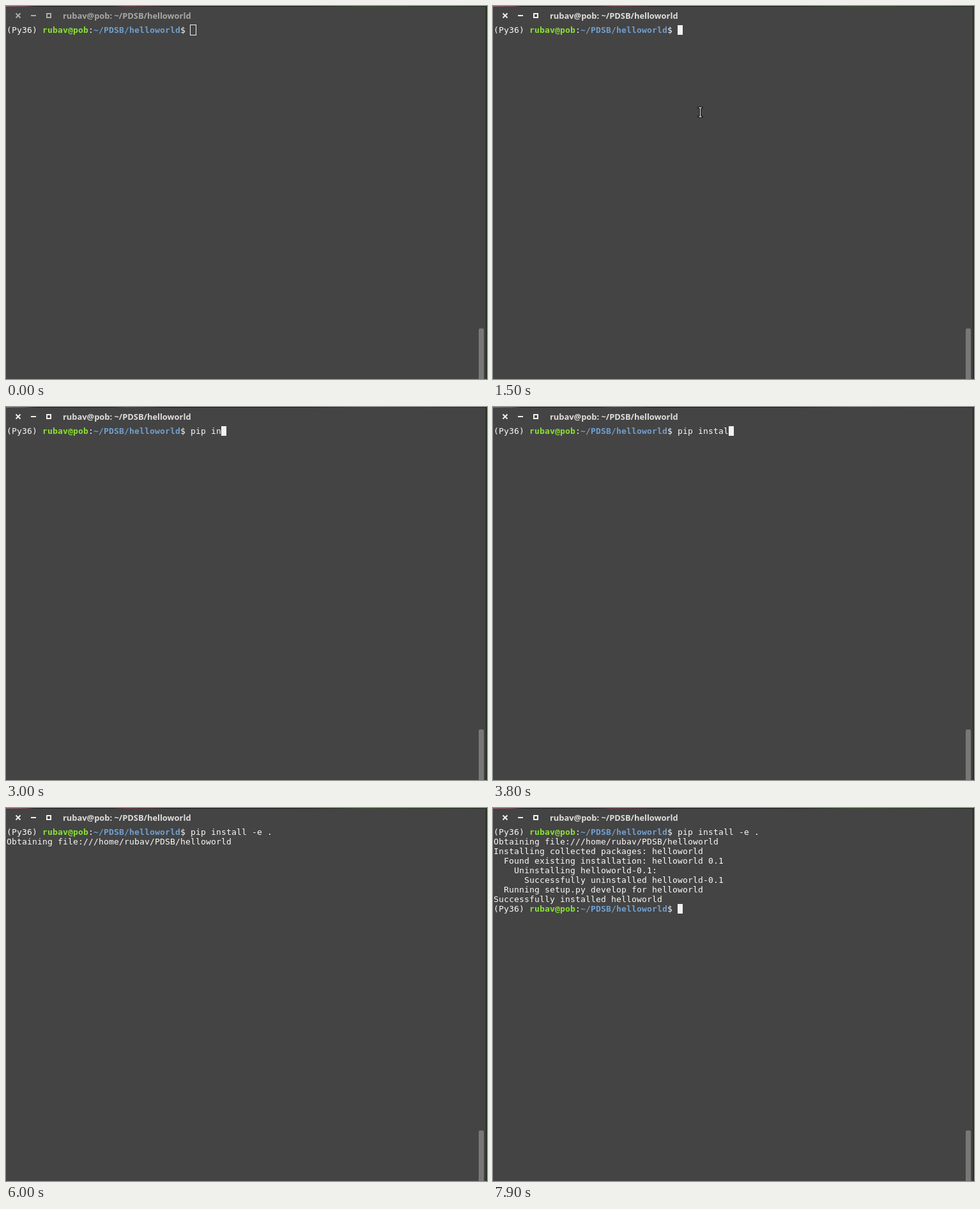
Recreate the animation shown at these times as an HTML page. Size 753 by 583 pixels, loop 8000 ms.

```html
<!DOCTYPE html>
<html lang="en">
<head>
<meta charset="utf-8">
<title>Terminal</title>
<style>
  html, body { margin: 0; width: 100%; height: 100%; overflow: hidden; background: #444; }
  svg { display: block; }
  text { white-space: pre; }
  /* whole-pixel terminal cells */
  #screen { font: 13px "DejaVu Sans Mono", monospace; letter-spacing: calc(8px - 1ch); fill: #fafaf8; }
  .user { fill: #8ae234; font-weight: bold; }
  .path { fill: #729fcf; font-weight: bold; }
  #title { font: bold 12.9px "Noto Sans", "Open Sans", sans-serif; }
</style>
</head>
<body>
<svg width="753" height="583" viewBox="0 0 753 583">
  <defs>
    <linearGradient id="desk">
      <stop offset="0" stop-color="#9a6272"/>
      <stop offset=".04" stop-color="#7a4654"/>
      <stop offset=".06" stop-color="#1c1a1a"/>
      <stop offset=".22" stop-color="#1c1a1a"/>
      <stop offset=".25" stop-color="#6e2f3c"/>
      <stop offset=".3" stop-color="#4a2029"/>
      <stop offset=".33" stop-color="#181818"/>
      <stop offset=".63" stop-color="#181c16"/>
      <stop offset=".75" stop-color="#2c4a1e"/>
      <stop offset="1" stop-color="#1e2a18"/>
    </linearGradient>
  </defs>
  <rect width="753" height="583" fill="#444"/>
  <rect width="753" height="1" fill="url(#desk)"/>
  <rect x="750" y="1" width="1" height="582" fill="#404040"/>
  <rect x="751" width="2" height="583" fill="#263020"/>
  <path d="M740 583V506q0-2 2-2h4q2 0 2 2v77z" fill="#787878"/>
  <g id="bar">
    <path d="M15.5 11.5l7 7m0-7l-7 7" stroke="currentColor" stroke-width="2"/>
    <path d="M39 15h8" stroke="currentColor" stroke-width="2"/>
    <rect x="64" y="12" width="6" height="6" fill="none" stroke="currentColor" stroke-width="2"/>
    <text id="title" x="89" y="20" fill="currentColor"></text>
  </g>
  <g id="screen"></g>
  <rect id="outline" x="288.5" y="29.5" width="9" height="16" fill="none" stroke="#f2f2f0"/>
  <rect id="cursor" width="8" height="15" fill="#f2f2f0"/>
  <g id="pointer" fill="none">
    <path d="M-2.5-7h5M0-7V7M-2.5 7h5" stroke="#111" stroke-width="3" stroke-linecap="square"/>
    <path d="M-2.5-7h5M0-7V7M-2.5 7h5" stroke="#fff"/>
  </g>
</svg>
<script>
const LOOP = 8000, COL = 8, ROW = 15, LEFT = 1, TOP = 30;
const USER = "rubav", HOST = "pob", DIR = "~/PDSB/helloworld";
const COMMAND = "pip install -e .";
const KEYS = [2200, 2400, 2500, 2800, 2900, 3000, 3400, 3500,
              3600, 3800, 4000, 4100, 4300, 4500, 4600, 5100];
const FOCUS = 1500, ENTER = 5500, PROMPT_COLS = 36;

const OUTPUT = [
  [5800, `Obtaining file:///home/${USER}/PDSB/helloworld`],
  [6100, "Installing collected packages: helloworld"],
  [6100, "  Found existing installation: helloworld 0.1"],
  [6100, "    Uninstalling helloworld-0.1:"],
  [6100, "      Successfully uninstalled helloworld-0.1"],
  [6100, "  Running setup.py develop for helloworld"],
  [6600, "Successfully installed helloworld"]
];
const PROMPT_AT = 6700;
const BLINK_OFF = [[2100, 2200], [6000, 6600], [7300, 7900]];
const POINTER = [[1100, 213.5, 118], [1200, 286.5, 150], [1300, 324.5, 166]];
const POINTER_END = 2200;

const $ = id => document.getElementById(id);
const show = (el, on) => el.setAttribute("visibility", on ? "visible" : "hidden");

function addText(row, parts, col = 0) {
  const line = document.createElementNS("http://www.w3.org/2000/svg", "text");
  line.setAttribute("y", TOP + row * ROW + 12);
  for (const [str, cls] of parts) {
    const span = document.createElementNS("http://www.w3.org/2000/svg", "tspan");
    span.textContent = str;
    span.setAttribute("x", LEFT + col * COL);
    if (cls) span.setAttribute("class", cls);
    line.append(span);
    col += str.length;
  }
  return $("screen").appendChild(line);
}

const addPrompt = row => addText(row, [
  ["(Py36) "], [`${USER}@${HOST}`, "user"], [":"], [DIR, "path"], ["$"]
]);

$("title").textContent = `${USER}@${HOST}: ${DIR}`;
addPrompt(0);
const typed = addText(0, [[""]], PROMPT_COLS).firstChild;
const lines = OUTPUT.map(([at, str], i) => ({ at, el: addText(i + 1, [[str]]) }));
const lastRow = OUTPUT.length + 1;
lines.push({ at: PROMPT_AT, el: addPrompt(lastRow) });

function cursorCell(t, count) {
  if (t < ENTER) return [PROMPT_COLS + count, 0];
  if (t >= PROMPT_AT) return [PROMPT_COLS, lastRow];
  return [0, 1 + OUTPUT.filter(([at]) => t >= at).length];
}

function draw(t) {
  const focused = t >= FOCUS;
  $("bar").setAttribute("color", focused ? "#f0efed" : "#aeaca9");
  $("title").setAttribute("fill", focused ? "#dfdddb" : "#a9a7a4");

  const count = KEYS.filter(at => t >= at).length;
  typed.textContent = COMMAND.slice(0, count);
  for (const { at, el } of lines) show(el, t >= at);

  const [col, row] = cursorCell(t, count);
  $("cursor").setAttribute("x", LEFT + col * COL);
  $("cursor").setAttribute("y", TOP + row * ROW);
  show($("cursor"), focused && !BLINK_OFF.some(([a, b]) => t >= a && t < b));
  show($("outline"), !focused);

  const spot = POINTER.filter(([at]) => t >= at).pop();
  show($("pointer"), spot && t < POINTER_END);
  if (spot) $("pointer").setAttribute("transform", `translate(${spot[1]} ${spot[2]})`);
}

const start = performance.now();
function tick() {
  draw((performance.now() - start) % LOOP);
  requestAnimationFrame(tick);
}
tick();
</script>
</body>
</html>
```
